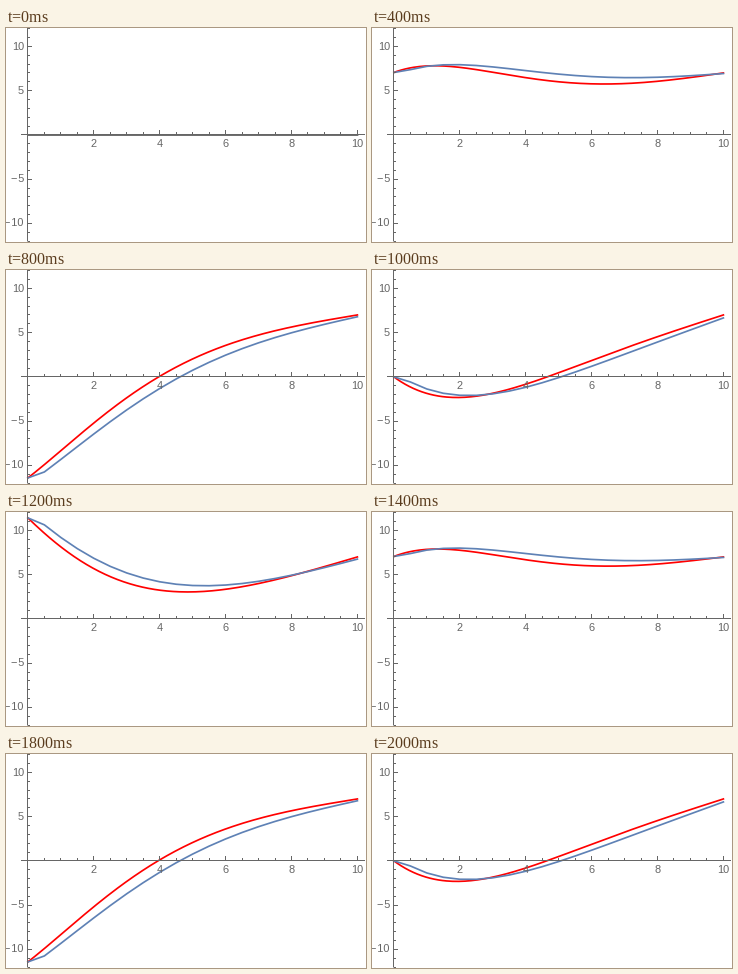
Recreate the animation shown at these times as a matplotlib script. Size 360 px wide and 214 px high, loop 2.1 s.

```python
import numpy as np
import matplotlib.pyplot as plt
from matplotlib.animation import FuncAnimation

W, H, FRAMES, STEP_MS = 360, 214, 21, 100
X0, Y0, SX, SY = 21.9, 106.9, 32.95, 8.85
LENGTH, AMP, RIGHT = 10, 12, 7
OMEGA = 2 * np.pi / 10  # radians per frame
GRAY, RED, BLUE = "#666666", "#ff0000", "#5e81b5"


def left_value(t):
    return AMP * np.sin(OMEGA * t)


def diffuse(d, cells, substeps):
    """Implicit heat flow on a rod at rest; one row of cell values per frame."""
    r = d * (cells / LENGTH) ** 2 / substeps
    m = (1 + 2 * r) * np.eye(cells) - r * (np.eye(cells, k=1) + np.eye(cells, k=-1))
    m[0, 0] += r
    m[-1, -1] += r
    step = np.linalg.inv(m)
    u = np.zeros(cells)
    rows = [u]
    for k in range(1, (FRAMES - 1) * substeps + 1):
        b = u.copy()
        b[0] += 2 * r * left_value(k / substeps)
        b[-1] += 2 * r * RIGHT
        u = step @ b
        if k % substeps == 0:
            rows.append(u)
    return rows


FINE, COARSE = 160, 20
fine = diffuse(3.88, FINE, 60)
coarse = diffuse(4.95, COARSE, 8)
fine_x = np.r_[0, (np.arange(FINE) + 0.5) * LENGTH / FINE, LENGTH]
coarse_x = np.arange(COARSE + 1) * LENGTH / COARSE

plt.rcParams["font.family"] = ["Liberation Sans", "DejaVu Sans"]
fig = plt.figure(figsize=(W / 72, H / 72), dpi=72, facecolor="white")
ax = fig.add_axes([0, 0, 1, 1])
ax.set_xlim(0, W)
ax.set_ylim(H, 0)
ax.axis("off")


def px(x):
    return X0 + SX * np.asarray(x)


def py(y):
    return Y0 - SY * np.asarray(y)


def pixel(v):
    """Centre of the pixel holding v, for crisp one-pixel lines."""
    return np.floor(v) + 0.5


def rule(xs, ys):
    ax.plot(xs, ys, color=GRAY, lw=1, zorder=3, snap=False, solid_capstyle="butt")


def label(x, y, text, ha):
    ax.text(x, y, text, color=GRAY, size=11, zorder=4, ha=ha, va="baseline")


axis_x, axis_y = pixel(X0), pixel(Y0)
rule([15, 359], [axis_y, axis_y])
rule([axis_x, axis_x], [0, 213])
for i in range(1, 21):
    x = pixel(px(i / 2))
    major = i % 4 == 0
    rule([x, x], [axis_y, axis_y - (4.5 if major else 2.5)])
    if major:
        label(x, 119, str(i // 2), "center")
for v in range(-12, 13):
    if v == 0:
        continue
    y = pixel(py(v))
    major = v % 5 == 0
    rule([axis_x, axis_x + (4.5 if major else 2.5)], [y, y])
    if major:
        label(18, y + 3, str(v).replace("-", "\u2212\u200a"), "right")

red, = ax.plot([], [], color=RED, lw=1.7, zorder=1, snap=False)
blue, = ax.plot([], [], color=BLUE, lw=1.7, zorder=2, snap=False)


def draw(n):
    b = left_value(n)
    end = RIGHT if n else 0
    red.set_data(px(fine_x), py(np.r_[b, fine[n], end]))
    blue.set_data(px(coarse_x), py(np.r_[b, coarse[n]]))
    # at rest both curves merge with the axis
    red.set_color(RED if n else GRAY)
    blue.set_color(BLUE if n else GRAY)
    return red, blue


anim = FuncAnimation(fig, draw, frames=FRAMES, interval=STEP_MS,
                     repeat=True, repeat_delay=0, blit=False)
plt.show()
```
